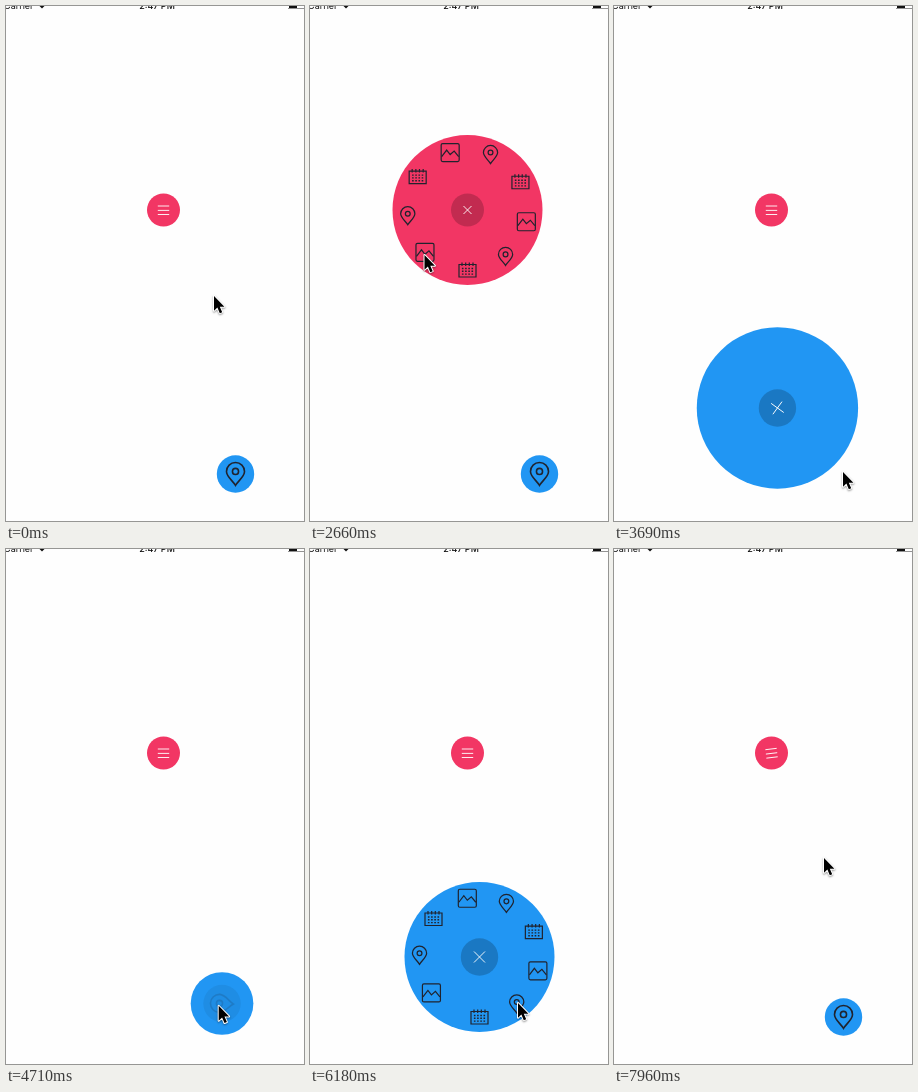
Animation of 298 by 515 pixels, one loop 8 s. Source, as an HTML page with a canvas:

```html
<!DOCTYPE html>
<html lang="en">
<head>
<meta charset="utf-8">
<title>Circle menus</title>
<style>
  html, body { margin: 0; width: 100%; height: 100%; overflow: hidden; background: #fefefe; }
  canvas { display: block; width: 298px; height: 515px; }
</style>
</head>
<body>
<canvas id="stage"></canvas>
<script>
const LOOP = 8000, STEP = 147;
const W = 298, H = 515, INK = '#20232e';
const canvas = document.getElementById('stage');
const ctx = canvas.getContext('2d');
const ratio = window.devicePixelRatio || 1;
canvas.width = W * ratio;
canvas.height = H * ratio;

const clamp = v => Math.max(0, Math.min(1, v));
const ramp = (t, from, to) => clamp((t - from) / (to - from));
const smooth = p => p * p * (3 - 2 * p);
const mix = (a, b, p) => a + (b - a) * p;

// Underdamped spring from 0 to 1, t in ms.
function spring(t) {
  if (t <= 0) return 0;
  const a = t * 0.0185;
  return 1 - Math.exp(-t * 0.0135) * (Math.cos(a) + 0.73 * Math.sin(a));
}

// runs: [open, close] times
const menus = [
  { color: '#2196f3', x: 229.5, y: 468, dx: -60, dy: -60, r: 18.7, cross: 5.5,
    icon: () => pin(1.27), runs: [[3505, 4600], [5320, 6230]] },
  { color: '#f23664', x: 157.5, y: 204, dx: 0, dy: 0, r: 16.5, cross: 4,
    icon: bars, runs: [[1627, 2830], [6779, 7740]] }
];

// time, x, y of the pointer tip
const pointerPath = [
  [0, 208, 290], [140, 208, 290], [735, 154, 197.5], [900, 154, 197.5],
  [1480, 148.5, 200], [1980, 148.5, 200], [2600, 114.5, 249], [2800, 114.5, 249],
  [3235, 241, 456], [3500, 229, 466], [3720, 229, 466], [4250, 208, 454],
  [4600, 208, 454], [5000, 236, 471], [5290, 222.5, 465], [5590, 222.5, 465],
  [5900, 208, 454], [6200, 208, 454], [6740, 152.5, 198], [7500, 152.5, 198],
  [7938, 210, 309]
];

function at(x, y, draw, angle = 0, alpha = 1) {
  ctx.save();
  ctx.translate(x, y);
  ctx.rotate(angle);
  ctx.globalAlpha *= alpha;
  draw();
  ctx.restore();
}

function disc(r, color) {
  ctx.fillStyle = color;
  ctx.beginPath();
  ctx.arc(0, 0, r, 0, 2 * Math.PI);
  ctx.fill();
}

function line(path, color, width) {
  ctx.strokeStyle = color;
  ctx.lineWidth = width;
  ctx.stroke(new Path2D(path));
}

function pin(scale) {
  ctx.scale(scale, scale);
  line('M0 9C-2 5.5-7.1 2-7.1-2A7.1 7.1 0 0 1 7.1-2C7.1 2 2 5.5 0 9Z', INK, 1.25);
  line('M2.4-2A2.4 2.4 0 1 1-2.4-2A2.4 2.4 0 1 1 2.4-2Z', INK, 1.25);
}

function picture() {
  line('M-7.5-9H7.5Q9-9 9-7.5V7.5Q9 9 7.5 9H-7.5Q-9 9-9 7.5V-7.5Q-9-9-7.5-9Z', INK, 1.2);
  line('M-8.5 4L-3.5-2.5L0 2L4-1.5L8.5 4', INK, 1.2);
}

function calendar() {
  line('M-8.5-5.5H8.5V7H-8.5ZM-5.5-7.5V-4M-1.8-7.5V-4M1.8-7.5V-4M5.5-7.5V-4', INK, 1.2);
  ctx.setLineDash([1.6, 1.6]);
  line('M-5.6-1.5H6M-5.6 1.3H6M-5.6 4.1H6', INK, 1.4);
}

function bars() {
  line('M-5.7-4H5.7M-5.7 .4H5.7M-5.7 4.5H5.7', '#fff', 0.9);
}

function cross(size) {
  line(`M${-size} ${-size}L${size} ${size}M${size} ${-size}L${-size} ${size}`, '#fff', 0.9);
}

const items = [calendar, () => pin(1), picture];

function drawMenu(menu, t) {
  const [open, close] = menu.runs.find(run => t < run[1] + 500) || menu.runs[1];
  const closing = ramp(t, close, close + 150);
  const size = spring(t - open) * (1 - smooth(closing));
  const press = ramp(t, open - 120, open - 20);
  const x = menu.x + menu.dx * size, y = menu.y + menu.dy * size;

  at(x, y, () => {
    disc(menu.r + (75 - menu.r) * size, menu.color);

    // Items fan out counterclockwise from the bottom.
    const fan = 1 - Math.exp(-Math.max(0, t - open - 300) / 174);
    const shown = ramp(t, open + 280, open + 400) * (1 - ramp(t, close, close + 60));
    if (shown) for (let i = 8; i >= 0; i--) {
      const a = (90 - 40 * i * fan) * Math.PI / 180;
      at(60 * Math.cos(a), 60 * Math.sin(a), items[i % 3], 0, shown);
    }

    disc(menu.r, `rgba(0,0,0,${0.2 * press * (1 - closing)})`);

    const turn = spring(t - open);
    const back = spring(t - close - 93);
    const crossAlpha = ramp(t, open, open + 100) * (1 - ramp(t, close, close + 90));
    const iconAlpha = t < close ? 1 - press : ramp(t, close + 93, close + 160);
    const iconTurn = t < close ? 0 : (back - 1) * Math.PI / 2;
    at(0, 0, () => cross(menu.cross), (1 - turn) * Math.PI / 2, crossAlpha);
    at(0, 0, menu.icon, iconTurn, iconAlpha);
  });
}

function drawPointer(t) {
  const next = pointerPath.findIndex(k => k[0] > t);
  const b = pointerPath[next < 0 ? pointerPath.length - 1 : next];
  const a = next < 0 ? b : pointerPath[next - 1];
  const p = a === b ? 1 : smooth(ramp(t, a[0], b[0]));
  const arrow = new Path2D('M0 0V14.8L3.4 11.6L5.8 17.2L8.2 16.2L5.8 10.7H10.4Z');
  at(mix(a[1], b[1], p), mix(a[2], b[2], p), () => {
    ctx.lineJoin = 'round';
    ctx.lineWidth = 2;
    ctx.strokeStyle = '#fff';
    ctx.shadowColor = 'rgba(0,0,0,.4)';
    ctx.shadowBlur = 2 * ratio;
    ctx.shadowOffsetY = ratio;
    ctx.stroke(arrow);
    ctx.shadowColor = 'transparent';
    ctx.fillStyle = '#000';
    ctx.fill(arrow);
  });
}

function drawStatus() {
  ctx.fillStyle = '#111';
  ctx.font = '9px Inter, "Liberation Sans", sans-serif';
  ctx.textAlign = 'right';
  ctx.fillText('Carrier', 27.5, 2.5);
  ctx.textAlign = 'center';
  ctx.font = '500 9px Inter, "Liberation Sans", sans-serif';
  ctx.fillText('2:47 PM', 151, 2.5);
  ctx.fill(new Path2D('M33.5 0H38.5L36 2.5Z'));
  ctx.fillRect(283, 0, 8, 2);
  ctx.fillStyle = '#777';
  ctx.fillRect(282, 2, 16, 0.8);
}

function frame(now) {
  const t = Math.floor(now % LOOP / STEP) * STEP;
  ctx.setTransform(ratio, 0, 0, ratio, 0, 0);
  ctx.fillStyle = '#fefefe';
  ctx.fillRect(0, 0, W, H);
  drawStatus();
  for (const menu of menus) drawMenu(menu, t);
  drawPointer(t);
  requestAnimationFrame(frame);
}
requestAnimationFrame(frame);
</script>
</body>
</html>
```
